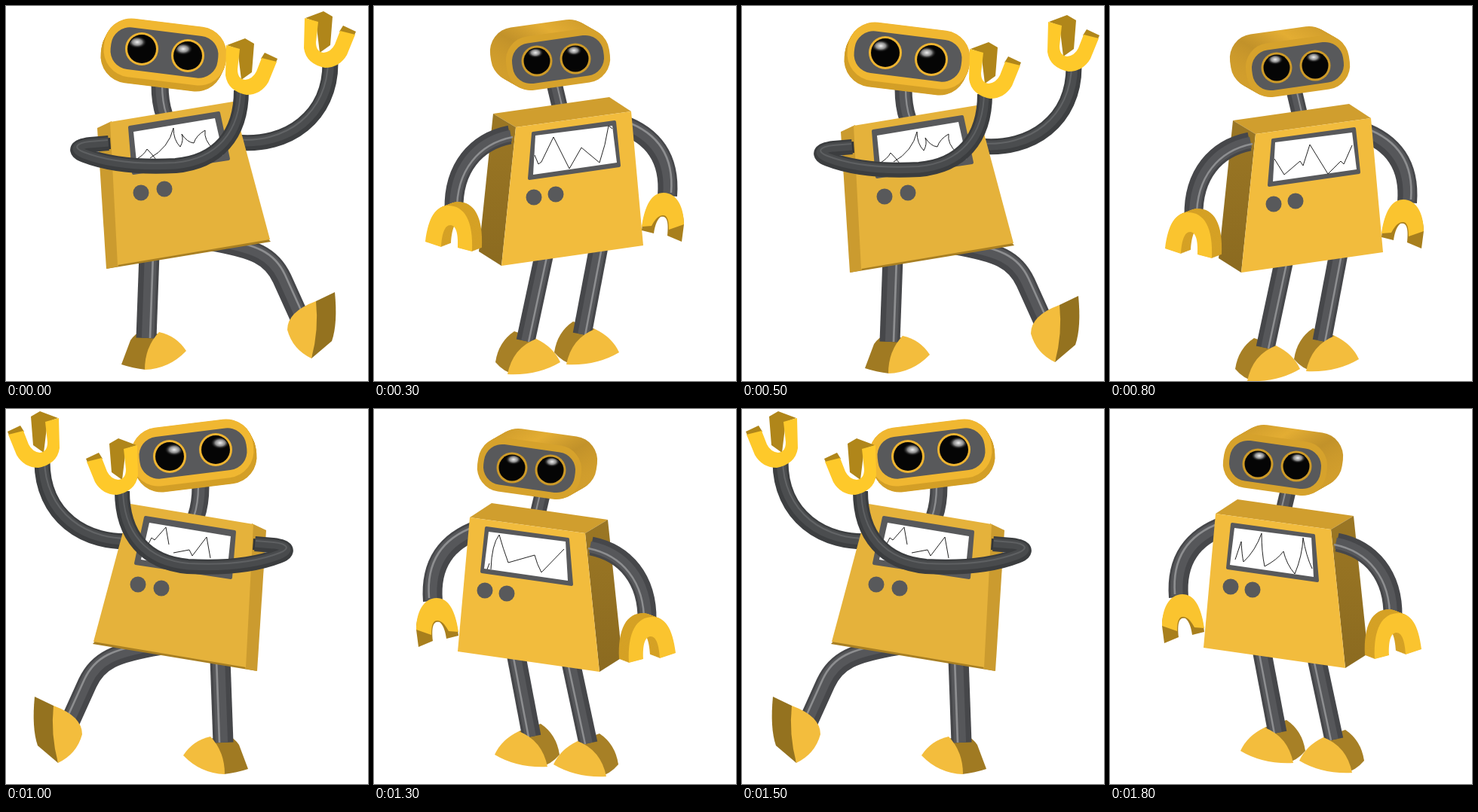
These frames come from a looping animation (480x498 px, 2 s). An HTML page with a canvas:

```html
<!DOCTYPE html>
<html lang="en">
<head>
<meta charset="utf-8">
<title>Dancing robot</title>
<style>
html, body { margin: 0; width: 100%; height: 100%; overflow: hidden; background: #fff; }
canvas { display: block; width: 480px; height: 498px; }
</style>
</head>
<body>
<canvas id="stage" width="480" height="498"></canvas>
<script>
const ctx = document.getElementById('stage').getContext('2d');
const GREY = '#58595b';
const LOOP = 2000;

// Mirror axis sum and vertical offset of each part when a pose faces the other way.
const FLIPS = {
  dab: { head: [458, -3], neck: [462, -2], body: [466, -1], screen: [467, 2],
         legs: [474, 2], back: [478, -6], front: [466, -3], claw: [466, -4] },
  stand: { head: [450, 8], neck: [464, 3], body: [468, 4], screen: [468, 4],
           legs: [485, -1], back: [467, 3], front: [468, 11], claw: [467, 3] }
};

const TRACES = {
  flames: 'M172 204Q183 198 187 190Q194 197 199 204M191 202Q216 188 222 162Q222 178 231 187Q236 178 233 170Q240 181 249 182Q252 172 264 165Q262 178 275 190',
  peaks: 'M213 198L218 210L222 207L238 174L259 216L275 188L299 208Q307 185 311 159L316 163',
  spikes: 'M218 203L231 224L252 206L256 212L265 184L289 223L306 206L310 210L321 185',
  hills: 'M187 183L193 171L197 174L212 157L216 180M222 191L243 187L247 195L266 170L271 198',
  valley: 'M150 213L153 205M155 213Q156 180 166 167Q171 185 178 204L213 194Q216 206 222 217L252 186',
  thorns: 'M166 200L174 176Q175 195 177 203Q193 188 201 165Q201 190 205 209Q222 200 230 189Q234 206 245 219Q255 195 256 171Q260 195 268 212'
};

const POSES = [
  { until: 300, kind: 'dab', x: 0, y: 0, trace: 'flames' },
  { until: 500, kind: 'stand', x: 0, y: 0, trace: 'peaks' },
  { until: 800, kind: 'dab', x: 10, y: 5, tx: 10, ty: 5, trace: 'flames' },
  { until: 1000, kind: 'stand', x: 5, y: 9, trace: 'spikes' },
  { until: 1300, kind: 'dab', flip: true, x: 0, y: 0, trace: 'hills' },
  { until: 1500, kind: 'stand', flip: true, x: 0, y: 0, trace: 'valley' },
  { until: 1800, kind: 'dab', flip: true, x: 3, y: 0, tx: 3, ty: 0, trace: 'hills' },
  { until: 2000, kind: 'stand', flip: true, x: 13, y: -5, trace: 'thorns' }
];

function fill(d, color) {
  ctx.fillStyle = color;
  ctx.fill(typeof d === 'string' ? new Path2D(d) : d);
}

function ramp(x0, y0, x1, y1, ...colors) {
  const g = ctx.createLinearGradient(x0, y0, x1, y1);
  colors.forEach((c, i) => g.addColorStop(i / (colors.length - 1), c));
  return g;
}

function shifted(x, y, paint) {
  ctx.save();
  ctx.translate(x, y);
  paint();
  ctx.restore();
}

function slab(w, h, r, cx, cy, deg) {
  const box = new Path2D(), out = new Path2D();
  box.roundRect(-w / 2, -h / 2, w, h, r);
  out.addPath(box, new DOMMatrix().translate(cx, cy).rotate(deg));
  return out;
}

function extrude(d, dx, dy, side, front) {
  const path = typeof d === 'string' ? new Path2D(d) : d;
  for (let i = 16; i > 0; i--) shifted(dx * i / 16, dy * i / 16, () => fill(path, side));
  fill(path, front);
}

function tube(d, width, hx, hy, dark = '#46474a', mid = '#56575a', light = '#8d8e90') {
  const path = new Path2D(d);
  const line = (w, color, k) => shifted(hx * k, hy * k, () => {
    ctx.lineWidth = w;
    ctx.strokeStyle = color;
    ctx.stroke(path);
  });
  ctx.lineJoin = 'round';
  line(width, dark, 0);
  line(width * 0.6, mid, 0.4);
  line(width * 0.1, light, 1);
}

function disc(x, y, r, color) {
  ctx.beginPath();
  ctx.arc(x, y, r, 0, Math.PI * 2);
  ctx.fillStyle = color;
  ctx.fill();
}

function eye(x, y, r, rim, gx, gy, size) {
  disc(x, y, r, rim);
  disc(x, y, r - 3, '#050505');
  const g = ctx.createRadialGradient(0, 0, 0, 0, 0, size);
  g.addColorStop(0, '#f0f0f0');
  g.addColorStop(0.5, '#8a8a8a');
  g.addColorStop(1, 'rgba(0,0,0,0)');
  ctx.save();
  ctx.beginPath();
  ctx.arc(x, y, r - 4, 0, Math.PI * 2);
  ctx.clip();
  ctx.translate(x + gx, y + gy);
  ctx.scale(1, 0.65);
  disc(0, 0, size, g);
  ctx.restore();
}

function screen(outer, inner) {
  const p = new Path2D(outer);
  ctx.lineJoin = 'round';
  ctx.lineWidth = 4;
  ctx.strokeStyle = GREY;
  ctx.stroke(p);
  fill(p, GREY);
  fill(inner, '#fff');
}

function trace(pose) {
  shifted(pose.tx || 0, pose.ty || 0, () => {
    ctx.lineWidth = 1;
    ctx.strokeStyle = '#222';
    ctx.stroke(new Path2D(TRACES[pose.trace]));
  });
}

function raisedClaw() {
  fill('M293 52L317 43L329 50L326 88L312 98L307 57Z', '#b0861a');
  fill('M338 70L343 62L360 70L357 77Z', '#b0861a');
  fill('M292 52L310 57L307 84Q307 97 317 98Q327 97 332 87L339 69L359 74L348 101Q338 118 319 118Q294 113 291 92Z', '#fec92a');
}

const DAB = {
  back() {
    tube('M305 181C375 188 430 146 430 76', 21, -3, -4, '#3d3f41', '#4b4d4f', '#626466');
  },
  legs() {
    fill('M153 476L165 444Q172 434 180 432L204 436Q190 450 185 483Q168 481 153 476Z', '#a07a22');
    tube('M190 330L186 441', 27, 5, 0);
    fill('M203 433Q226 438 239 458Q216 482 184 483Q184 453 203 433Z', '#f3bd3d');
    tube('M270 312C330 322 352 332 366 362L389 413', 26, 4, -5);
    fill('M411 392L436 380Q440 422 432 445L405 468Z', '#94721f');
    fill('M411 392Q373 406 373 430Q380 456 405 468Q415 430 411 392Z', '#f3bd3d');
  },
  neck() {
    tube('M204 104Q204 128 210 145', 23, 3, 0);
  },
  body() {
    fill('M133 349L351 313L345 306L150 340Z', '#a87f22');
    fill('M121 162L140 153L149 346L133 349Z', '#cb9b2f');
    fill('M138 154L301 127L350 310L148 344Z', '#e5b23b');
  },
  screen() {
    screen('M164 161L282 142L295 203L169 222Z', 'M169 167L277 149L288 198L174 216Z');
  },
  head() {
    extrude(slab(163, 78, 36, 211, 61, 7), -4, 8, '#d39f27', '#f0b731');
    fill(slab(143, 56, 25, 210, 62, 7), GREY);
    eye(180, 57, 22, '#eeb431', -6, -9, 13);
    eye(241, 66, 22, '#eeb431', -6, -9, 13);
  },
  front() {
    fill('M121 177L138 175L139 190L118 192Z', '#333537');
    tube('M136 182L112 184C94 186 89 192 104 198C140 212 188 214 225 212C280 207 312 172 312 112',
      20, -1, -4, '#3b3d3f', '#494b4d', '#5e6062');
  },
  claw() {
    raisedClaw();
    shifted(104, -36, raisedClaw);
  }
};

const STAND = {
  back() {
    tube('M328 157C370 172 393 202 389 252', 26, 5, -4);
  },
  legs() {
    const dark = 'M161 473Q165 446 186 432L215 442L186 489Q172 486 161 473Z';
    const lit = 'M215 442Q238 453 247 473Q217 491 177 489Q184 454 215 442Z';
    const legs = [[0, 0, 'M226 328L201 445'], [78, -13, 'M298 320L276 436']];
    for (const [x, y, leg] of legs) {
      shifted(x, y, () => fill(dark, '#a78026'));
      tube(leg, 25, 4, 1);
      shifted(x, y, () => fill(lit, '#f3bd3d'));
    }
  },
  neck() {
    tube('M239 103L248 141', 21, 3, -1);
  },
  body() {
    fill('M158 143L312 121L341 140L188 161Z', '#d09e2e');
    fill('M158 143L188 161L169 345L139 326Z', ramp(150, 160, 160, 335, '#9a7624', '#8c6b20'));
    fill('M188 161L341 140L357 318L169 345Z', '#f2bc3d');
  },
  screen() {
    screen('M211 169L319 154L325 212L206 229Z', 'M214 172L316 159L322 208L211 224Z');
  },
  head() {
    const side = ramp(158, 100, 290, 20, '#dda72e', '#c2922a', '#e3ad33', '#d09d2c');
    extrude(slab(138, 72, 32, 244, 71, -8), -21, -12, side, '#d6a22c');
    fill(slab(122, 54, 24, 244, 71, -8), GREY);
    eye(216, 73, 20.5, '#cd9a28', -2, -11, 11);
    eye(267, 70, 20.5, '#cd9a28', -2, -11, 11);
  },
  front() {
    tube('M180 171C135 180 105 215 106 270', 25, 4, 3);
    extrude('M68 313C72 280 82 266 98 265C120 265 132 285 130 326L111 321C112 300 108 291 101 291C94 291 90 302 89 320Z',
      13, -5, '#d5a125', '#fac42f');
  },
  claw() {
    fill('M355 298C358 268 368 250 384 250C402 250 411 272 411 290L408 313L389 305C391 285 388 278 380 280C374 285 372 295 371 302Z', '#a87f1d');
    fill('M355 293C359 265 368 248 384 248C402 248 411 268 411 290L391 297C391 282 388 277 382 278C375 279 371 287 368 292Z', '#fac42f');
  }
};

function knobs(pose) {
  const spots = pose.kind === 'dab'
    ? (pose.flip ? [[175, 233], [206, 238]] : [[179, 248], [210, 243]])
    : (pose.flip ? [[147, 241], [176, 245]] : [[212, 254], [241, 250]]);
  for (const [x, y] of spots) disc(x + pose.x, y + pose.y, 10.5, GREY);
}

function draw(pose) {
  const parts = pose.kind === 'dab' ? DAB : STAND;
  const put = name => shifted(pose.x, pose.y, () => {
    if (pose.flip) {
      const [axis, dy] = FLIPS[pose.kind][name];
      ctx.transform(-1, 0, 0, 1, axis, dy);
    }
    parts[name]();
  });

  ctx.fillStyle = '#fff';
  ctx.fillRect(0, 0, 480, 498);
  ['back', 'legs', 'neck', 'body', 'screen'].forEach(put);
  trace(pose);
  knobs(pose);
  ['head', 'front', 'claw'].forEach(put);
}

const start = performance.now();
function tick(now) {
  const t = Math.max(0, now - start) % LOOP;
  draw(POSES.find(p => t < p.until));
  requestAnimationFrame(tick);
}
draw(POSES[0]);
requestAnimationFrame(tick);
</script>
</body>
</html>
```
